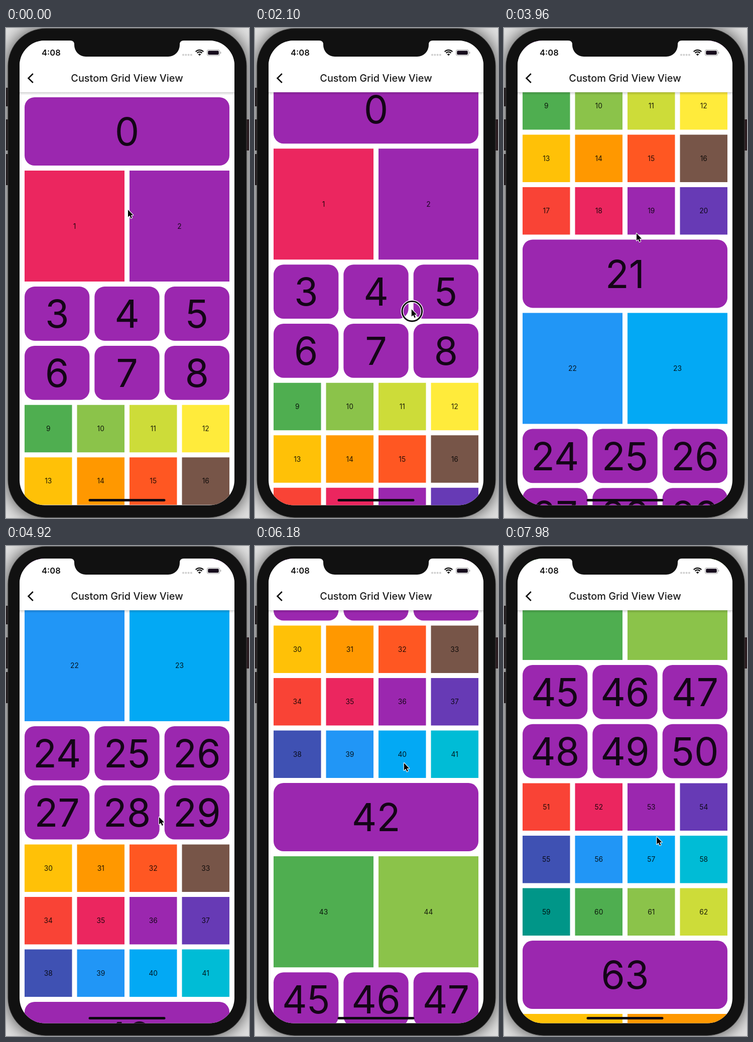
An HTML page with a canvas that plays this animation: 484x976 px, repeating every 8000 ms.

```html
<!DOCTYPE html>
<html lang="en">
<head>
<meta charset="utf-8">
<title>Custom grid</title>
<style>
html, body { margin: 0; width: 484px; height: 976px; overflow: hidden; }
canvas { display: block; width: 484px; height: 976px; }
</style>
</head>
<body>
<canvas id="stage"></canvas>
<script>
const W = 484, H = 976, LOOP = 8000, STEP = 60;
const FONT = 'Inter, Roboto, sans-serif';
const INK = '#111', PURPLE = '#9b27af';
const COLORS = ['#f94336', '#eb265f', PURPLE, '#673ab5', '#3f51b3', '#2196f6', '#03a9f4', '#00bcd6',
  '#009688', '#4fae50', '#8bc34a', '#cddc39', '#ffeb3b', '#ffc107', '#ff9800', '#ff5722', '#775548'];

const canvas = document.getElementById('stage');
const ctx = canvas.getContext('2d');
const dpr = window.devicePixelRatio || 1;
canvas.width = W * dpr;
canvas.height = H * dpr;

// Repeating block: rows of one to four columns; odd counts are large rounded cards
const LEFT = 37, TOP = 138, GRID = 408, GAP = 10;
const BLOCK = [
  { cols: 1, ratio: 3, rows: 1 },
  { cols: 2, ratio: 0.9, rows: 1 },
  { cols: 3, ratio: 1.2, rows: 2 },
  { cols: 4, ratio: 1, rows: 3 }
];

// Every flick drags up by the same distance, then the list coasts while the pointer goes back down
const DRAG = 195, DRAG_X = 32, HOLD = 280, PRESS_Y = 604, PAUSE = 150, DECAY = 500, END_X = 306;
const START = { x: 243, y: 362, at: 450, coast: 0, back: 1400, scroll: 0 };
const FLICKS = [
  { x: 319, at: 2280, coast: 246.3, back: 750 },
  { x: 296, at: 3939, coast: 537.1, back: 1400 },
  { x: 325, at: 5800, coast: 353.6, back: 870 },
  { x: 325, at: 7100, coast: 359.7, back: 1000 }
];

const clamp = u => Math.max(0, Math.min(1, u));
const smooth = u => u * u * u * (u * (6 * u - 15) + 10);

function glide(from, toX, t) {
  const past = Math.max(0, t - from.at);
  const k = smooth(clamp((past - PAUSE) / from.back));
  return {
    scroll: from.scroll + from.coast * (1 - Math.exp(-past / DECAY)),
    x: from.x + (toX - from.x) * k,
    y: from.y + (PRESS_Y - from.y) * k,
    down: false
  };
}

function drag(flick, scroll, k) {
  return { scroll: scroll + DRAG * k, x: flick.x - DRAG_X * k, y: PRESS_Y - DRAG * k, down: true };
}

function poseAt(t) {
  let from = START;
  for (const flick of FLICKS) {
    const press = flick.at - HOLD;
    if (t < press) return glide(from, flick.x, t);
    const { scroll } = glide(from, flick.x, press);
    if (t < flick.at) return drag(flick, scroll, Math.pow((t - press) / HOLD, 1.45));
    from = { ...flick, ...drag(flick, scroll, 1) };
  }
  return glide(from, END_X, t);
}

function box(x, y, w, h, r, fill) {
  ctx.beginPath();
  ctx.roundRect(x, y, w, h, r);
  ctx.fillStyle = fill;
  ctx.fill();
}

function poly(points, close) {
  ctx.beginPath();
  points.forEach(([x, y]) => ctx.lineTo(x, y));
  if (close) ctx.closePath();
}

function stroke(width, color) {
  ctx.lineWidth = width;
  ctx.strokeStyle = color;
  ctx.stroke();
}

function text(str, x, y, size, weight, color, align = 'center') {
  ctx.font = `${weight} ${size}px ${FONT}`;
  ctx.textAlign = align;
  ctx.fillStyle = color;
  ctx.fillText(str, x, y);
}

function drawBody() {
  ctx.fillStyle = '#e2e2e2';
  ctx.fillRect(0, 0, W, H);
  ctx.save();
  ctx.shadowColor = 'rgba(0,0,0,.75)';
  ctx.shadowBlur = 34 * dpr;
  box(4, 1, 475, 974, 75, INK);
  ctx.restore();
  for (const [y, h] of [[119, 37], [182, 62], [251, 62]]) box(-3, y, 8, h, 1, '#231d1f');
  box(478, 182, 9, 62, 1, '#2a1c20');
  box(3.5, 0.5, 476, 975, 75.5, '#3c3c3c');
  box(4.5, 1.5, 474, 973, 74.5, INK);
}

function drawGrid(scroll) {
  let y = TOP - scroll, n = 0;
  while (y < H) {
    for (const { cols, ratio, rows } of BLOCK) {
      const w = (GRID - GAP * (cols - 1)) / cols, h = w / ratio, large = cols % 2;
      for (let i = 0; i < cols * rows; i++, n++) {
        const x = LEFT + (i % cols) * (w + GAP);
        const top = y + Math.floor(i / cols) * (h + GAP);
        box(x, top, w, h, large ? 20 : 0, large ? PURPLE : COLORS[n % COLORS.length]);
        const [size, drop] = large ? [77, 28.3] : [13.8, 5];
        text(n, x + w / 2, top + h / 2 + drop, size, 400, 'rgba(0,0,0,.87)');
      }
      y += rows * (h + GAP);
    }
  }
}

function drawStatus() {
  text('4:08', 71, 55, 16.5, 600, INK, 'left');
  for (let i = 0; i < 4; i++) box(351 + i * 5.3, 51.5, 4, 4, 2, '#cfcfcf');
  const fan = [-Math.PI * 0.76, -Math.PI * 0.24];
  for (const r of [10.6, 6.8]) {
    ctx.beginPath();
    ctx.arc(385.5, 54.5, r, ...fan);
    stroke(2.3, INK);
  }
  ctx.beginPath();
  ctx.moveTo(385.5, 55.3);
  ctx.arc(385.5, 55.3, 4, ...fan);
  ctx.fillStyle = INK;
  ctx.fill();
  box(400, 43, 26, 12.5, 4, '#a5a5a5');
  box(401, 44, 24, 10.5, 3, '#fff');
  box(402.2, 45.2, 21.6, 8.1, 2, '#160c1c');
  box(426.8, 47.3, 1.5, 4, [0, 1, 1, 0], '#a5a5a5');
}

function drawHeader() {
  const shade = ctx.createLinearGradient(0, 127, 0, 134);
  shade.addColorStop(0, 'rgba(0,0,0,.28)');
  shade.addColorStop(0.35, 'rgba(0,0,0,.12)');
  shade.addColorStop(1, 'rgba(0,0,0,0)');
  ctx.fillStyle = shade;
  ctx.fillRect(27, 127, 428, 7);
  ctx.fillStyle = '#fff';
  ctx.fillRect(27, 25, 428, 103);
  drawStatus();
  text('Custom Grid View View', 241, 107, 19.9, 500, '#1c1c1c');
  poly([[53.8, 91], [44.6, 100], [53.8, 109]]);
  stroke(2.7, INK);
}

function drawNotch() {
  ctx.beginPath();
  ctx.moveTo(128, 24);
  ctx.lineTo(128, 25);
  ctx.quadraticCurveTo(136, 25, 136, 33);
  ctx.arcTo(136, 57, 160, 57, 23);
  ctx.arcTo(346, 57, 346, 33, 23);
  ctx.lineTo(346, 33);
  ctx.quadraticCurveTo(346, 25, 354, 25);
  ctx.lineTo(354, 24);
  ctx.fillStyle = INK;
  ctx.fill();
}

function drawPointer({ x, y, down }) {
  ctx.save();
  ctx.translate(x, y);
  if (down) {
    ctx.beginPath();
    ctx.arc(1, 4, 19.8, 0, Math.PI * 2);
    stroke(5.6, '#fff');
    stroke(2.8, '#000');
  }
  poly([[0, 0], [0, 14.6], [3.4, 11.5], [5.8, 17], [8, 16], [5.7, 10.7], [10.2, 10.7]], true);
  ctx.lineJoin = 'round';
  stroke(2.2, '#fff');
  ctx.fillStyle = '#000';
  ctx.fill();
  ctx.restore();
}

function draw(t) {
  const pose = poseAt(t);
  ctx.setTransform(dpr, 0, 0, dpr, 0, 0);
  drawBody();
  ctx.save();
  ctx.beginPath();
  ctx.roundRect(27, 25, 428, 925.5, 50);
  ctx.clip();
  ctx.fillStyle = '#fff';
  ctx.fillRect(0, 0, W, H);
  drawGrid(pose.scroll);
  drawHeader();
  box(164.5, 938, 153, 5, 2.5, '#0c0810');
  ctx.restore();
  drawNotch();
  drawPointer(pose);
}

const start = performance.now();
function tick() {
  const t = (performance.now() - start) % LOOP;
  draw(Math.floor(t / STEP) * STEP);
  requestAnimationFrame(tick);
}
tick();
</script>
</body>
</html>
```
